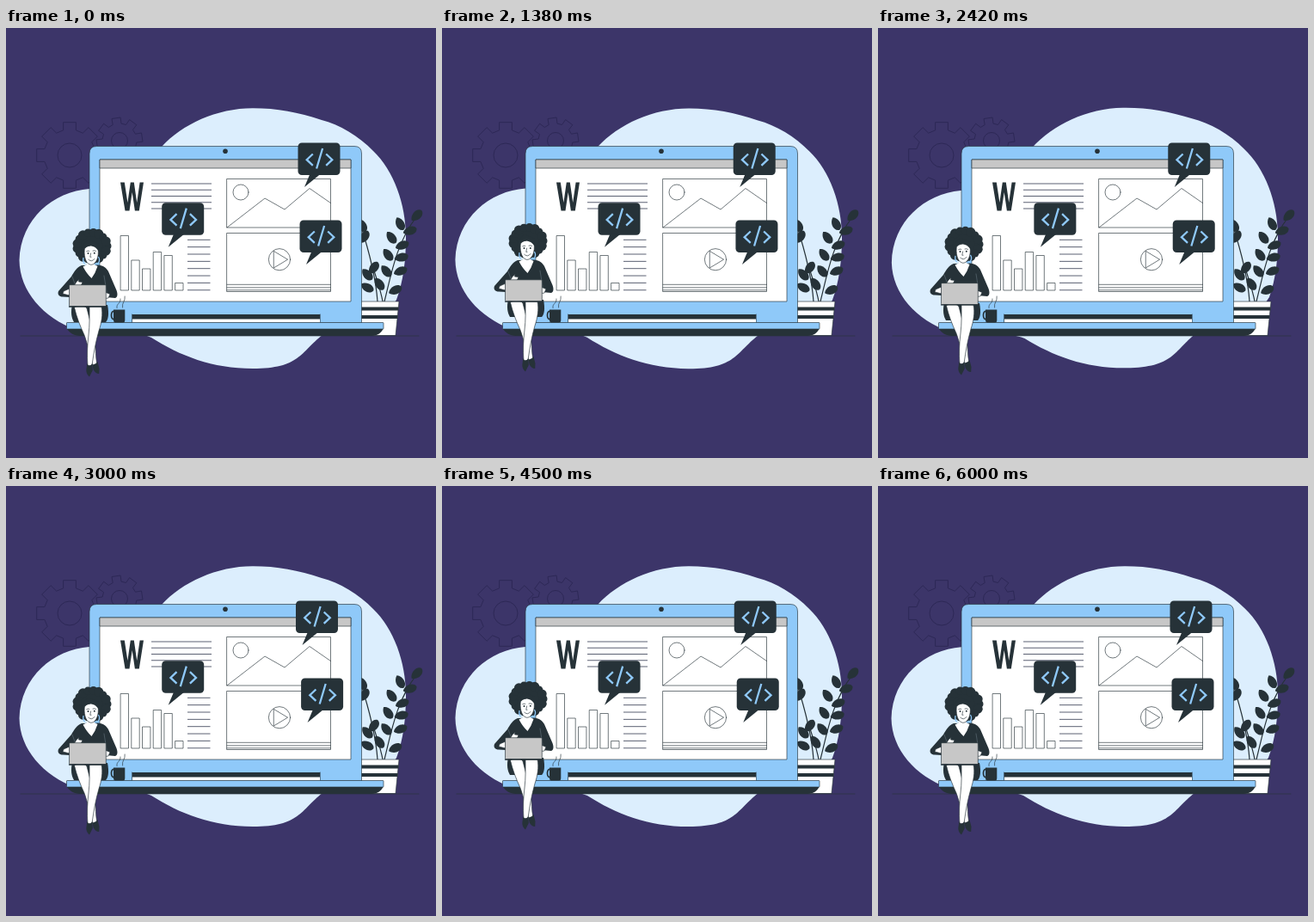
Recreate the animation shown at these times as an HTML page. Size 500x500 px, loop 6.04 s.

```html
<!DOCTYPE html>
<html lang="en">
<head>
<meta charset="utf-8">
<title>Web design illustration</title>
<style>
  html, body { margin: 0; width: 100%; height: 100%; overflow: hidden; background: #3c3569; }
  svg { display: block; width: 100vw; height: 100vh; }
  .dark { fill: #263238; }
  .blue { fill: #8fc9f9; }
  .white { fill: #fff; }
  .line { fill: none; stroke: #263238; stroke-width: .65; stroke-linejoin: round; stroke-linecap: round; }
  .outlined { stroke: #263238; stroke-width: .65; stroke-linejoin: round; }
  .text-lines { fill: none; stroke: #484e62; stroke-width: .9; }
  .gear { fill: none; stroke: #2d2856; stroke-width: 1; stroke-linejoin: round; }
  .code { fill: none; stroke: #8fc9f9; stroke-width: 2.3; }
</style>
</head>
<body>
<svg viewBox="0 0 500 500">
  <defs>
    <g id="bubble">
      <rect class="dark" width="49" height="37.5" rx="4.5"/>
      <path class="dark" d="M14 36 L7.5 51.5 L26.5 36Z"/>
      <path class="code" d="M17.3 13 L10.2 19.7 L17.3 26.4 M28.6 6.5 L21.6 30 M32.7 13 L39.8 19.7 L32.7 26.4"/>
    </g>
  </defs>

  <path id="bigGear" class="gear"/>
  <circle class="gear" cx="74" cy="148" r="14"/>
  <path id="smallGear" class="gear"/>
  <circle class="gear" cx="132" cy="131" r="9.5"/>

  <path id="blob" fill="#dceefd" d="M97 187 C55 190 17 222 15.5 270 C16 306 43 337 82 351
    C112 358 147 350 169 360 C202 381 240 396 287 396 C342 396 342 377 368 357
    C400 345 438 343 454 316 C462 295 465 270 465 243 C465 205 451 166 427 143
    C411 126 387 112 367 107 C340 98 315 93.3 287 93.3 C245 93.3 205 112 181 138
    C155 165 140 186 97 187Z"/>

  <g id="plant">
    <path class="line" style="stroke-width:1.2" d="M440 318 C448 286 454 250 477 220 M432 318 C430 290 423 262 412 228 M438 318 C436 306 431 292 427 279"/>
  </g>
  <path class="white outlined" d="M411 318 H457 L453 357.5 H411Z"/>
  <path class="dark" d="M411 324.5 H456.6 L456.2 328.5 H411Z M411 334 H455.6 L455.2 338 H411Z"/>
  <path class="line" d="M17 358 H480"/>

  <path class="blue outlined" d="M97 343 V146 Q97 137.5 105.5 137.5 H405 Q413.5 137.5 413.5 146 V343Z"/>
  <circle class="dark" cx="255" cy="143.3" r="2.8"/>
  <path class="line" d="M146.5 342 V333 M365.3 342 V333"/>
  <rect class="white" x="147" y="338" width="218" height="4.5"/>
  <rect class="dark" x="147" y="333" width="218" height="5.5"/>
  <rect class="white outlined" x="109" y="153" width="292" height="165"/>
  <rect class="outlined" fill="#c7c7c7" x="109" y="153" width="292" height="10"/>
  <path class="dark" d="M70.5 349 H439 C437 354 432 358 425 358 H86 C79 358 73 354 70.5 349Z"/>
  <rect class="blue outlined" x="70.5" y="342.5" width="368.5" height="7.5" rx=".6"/>

  <path class="dark" d="M133 179.5 H137.8 L141.4 203 L144.8 179.5 H148.8 L152.2 203 L155.6 179.5 H160
    L154.8 212.5 H149.9 L146.7 191 L143.5 212.5 H138.5Z"/>
  <path id="textLines" class="text-lines"/>
  <g id="chart"></g>
  <g class="line">
    <rect x="257" y="175.5" width="120.5" height="56.5"/>
    <circle cx="273" cy="191" r="9"/>
    <path d="M257 232 L301 198 L324 211 L353 186.5 L377.5 203.5"/>
    <rect x="257" y="238.5" width="120.5" height="68"/>
    <path d="M257 298.3 H377.5 M257 301.8 H377.5 M257 304.8 H377.5"/>
    <circle cx="318" cy="269.2" r="12.6"/>
    <path d="M311.6 259.6 L327.6 269.2 L311.6 278.8Z"/>
  </g>

  <use id="bubbleA" href="#bubble"/>
  <use id="bubbleB" href="#bubble"/>
  <use id="bubbleC" href="#bubble"/>

  <path class="dark" d="M125 327.5 H138.3 V340 Q138.3 342.5 136 342.5 H127.3 Q125 342.5 125 340Z"/>
  <path class="line" style="stroke-width:1.7" d="M125.5 329.5 C121.5 328.5 121.5 339.5 125.5 338.5"/>
  <path class="line" d="M129 325.5 C128 320 133.5 321 133 315 M135.5 325 C134.5 319 139 318 138.2 312"/>

  <g id="woman">
    <g id="hair" class="dark"></g>
    <path class="dark" d="M77 322 H118 C120 332 119 339 116 342 H79 C76 337 75 330 77 322Z"/>
    <path class="white outlined" d="M79.5 325 C82 322 92 322 94 326 C97 338 101 352 103 364 C105 375 104 383 106 391
      L101 394 C97 378 95 368 91 357 C86 346 82 336 79.5 325Z"/>
    <path class="white outlined" d="M97 324 H111 C113 333 111 343 108 352 C104 366 102 378 100 392
      L95 393 C94 380 94.5 370 96 357 C97.5 345 97 335 97 324Z"/>
    <path class="dark" d="M94.3 390 Q97 396 100.3 390 L100.8 398 L97 405.5 Q93.5 403 93.3 398Z M100.5 391 Q104 392 106.4 388 L108.5 396 L108.2 402 Q104 402 101.5 397Z"/>
    <path class="dark" d="M88 276 C82 278 79 284 76 289 L61 306 C59.5 310 62 312.5 66 312.5 L74 313 H116 L127 314 C130 313 130 309 128.5 305 L119 283 C116 278 112 276 107 275.5Z"/>
    <path class="white" d="M94.5 271 V275 L89.5 277.5 Q94 286 99.5 291 Q104 285 106.5 277 L102.5 275 V270Z"/>
    <path class="line" d="M77 289 L81 300 M114 288 L117 307" style="stroke:#71808a;stroke-width:.5"/>
    <path class="white outlined" d="M91.2 258 C91 253 105 250 107 257 C108.5 265 105 275.3 99 275.3 C93.5 275 90.5 267 91.2 258Z"/>
    <path class="dark" d="M89.5 261 C90 252 102 250 108 260 V251 L96 246 L88 253Z"/>
    <path class="line" d="M93.6 259.7 Q95 258.6 96.8 259.3 M101 259 Q103 258.2 104.6 259.4 M98.6 262 L97.8 266.3 H99 M95.8 269.2 Q99.5 273 103 268.4"/>
    <circle class="dark" cx="95.5" cy="262" r="1"/>
    <circle class="dark" cx="102.8" cy="261.8" r="1"/>
    <path fill="none" stroke="#8fc9f9" stroke-width="1.3" d="M90 267 Q89 273 92 274 M107.4 266 Q110 270 107 274"/>
    <path class="white outlined" d="M79 300 L82 295 L85 292.5 L84.5 295 L89 295.5 L87 300Z"/>
    <path class="white outlined" d="M115 307 L121 309.5 L119 314 L115 314.5Z"/>
    <path class="white outlined" d="M67 306 L74 303 V311 L66 309Z"/>
    <rect class="outlined" fill="#c7c7c7" x="73.5" y="298.7" width="42.8" height="25" rx="1"/>
    <path class="line" d="M73.5 324 H117" style="stroke-width:1.3"/>
  </g>
</svg>
<script>
const LOOP = 6040, SWAY = LOOP / 2;
const byId = id => document.getElementById(id);

function add(parent, name, attrs) {
  const node = document.createElementNS("http://www.w3.org/2000/svg", name);
  for (const key in attrs) node.setAttribute(key, attrs[key]);
  byId(parent).appendChild(node);
}

function gearPath(cx, cy, outer, inner, teeth, turn) {
  const point = (radius, angle) =>
    `${(cx + radius * Math.cos(angle)).toFixed(1)} ${(cy + radius * Math.sin(angle)).toFixed(1)}`;
  const points = [];
  for (let i = 0; i < teeth; i++) {
    const a = turn + i * 2 * Math.PI / teeth;
    points.push(point(inner, a - .25), point(outer, a - .19), point(outer, a + .19), point(inner, a + .25));
  }
  return `M${points.join("L")}Z`;
}

byId("bigGear").setAttribute("d", gearPath(74, 148, 39, 30, 8, 0));
byId("smallGear").setAttribute("d", gearPath(132, 131, 27, 20, 8, -.15));

let rows = "";
for (let i = 0; i < 5; i++) rows += `M169 ${181 + i * 7.25}H239`;
for (let i = 0; i < 8; i++) rows += `M211 ${246.3 + i * 8.35}H237.5`;
byId("textLines").setAttribute("d", rows);

[241.5, 270, 280, 260.5, 264.5, 296.5].forEach((top, i) =>
  add("chart", "rect", { class: "line", x: 133.5 + i * 12.7, y: top, width: 9, height: 305 - top }));

// Leaf: centre x, y, tilt in degrees
[[478, 218, -42], [470, 236, -15], [458, 228, 65], [461, 253, -18], [448, 244, 55],
 [460, 267, -10], [444, 264, 55], [459, 283, -18], [442, 283, 52], [453, 305, -22],
 [434, 298, 58], [428, 279, -50], [420, 287, 50], [420, 302, 30], [414, 230, 65],
 [417, 243, -55]].forEach(([x, y, tilt]) =>
  add("plant", "path", { class: "dark", d: "M-8.5 0C-5 -6.5 6 -7 8 -1C7 6 -4 6.5 -8.5 0Z",
    transform: `translate(${x} ${y}) rotate(${tilt})` }));

add("hair", "ellipse", { cx: 100, cy: 253.3, rx: 19.5, ry: 18 });
for (let i = 0; i < 17; i++) {
  const a = i * 2 * Math.PI / 17;
  add("hair", "circle", {
    cx: 100 + 17.5 * Math.cos(a), cy: 253.5 + 15.8 * Math.sin(a), r: 5 + .6 * Math.sin(i * 2.4)
  });
}

// Eased, cyclic sideways drift between a few stops
const times = [0, 880, 1880, 3000, 3880, 5080, LOOP];
function drift(stops, t) {
  let i = 0;
  while (t >= times[i + 1]) i++;
  const part = (t - times[i]) / (times[i + 1] - times[i]);
  return stops[i] + (stops[i + 1] - stops[i]) * (1 - Math.cos(Math.PI * part)) / 2;
}

const bubbles = [
  ["bubbleA", 339.5, 133.5, [0, .5, -2, -2.5, 0, .5, 0]],
  ["bubbleB", 341.5, 223.5, [0, -1, .9, 1.6, .5, 1.9, 0]],
  ["bubbleC", 181.2, 203.2, [0, .3, .3, 0, .3, .4, 0]]
];

// Triangle wave: 0, 1, 0, -1, 0
const triangle = p => p < .25 ? p * 4 : p < .75 ? 2 - p * 4 : p * 4 - 4;

function draw(t) {
  const phase = t % SWAY / SWAY;
  const lift = -3 * (1 - Math.cos(2 * Math.PI * phase));
  byId("woman").setAttribute("transform", `translate(0 ${lift})`);
  byId("blob").setAttribute("transform", `rotate(${triangle(phase)} 241 245)`);
  for (const [id, x, y, stops] of bubbles)
    byId(id).setAttribute("transform", `translate(${x + drift(stops, t)} ${y})`);
}

const start = performance.now();
function tick() {
  draw((performance.now() - start) % LOOP);
  requestAnimationFrame(tick);
}
draw(0);
requestAnimationFrame(tick);
</script>
</body>
</html>
```
